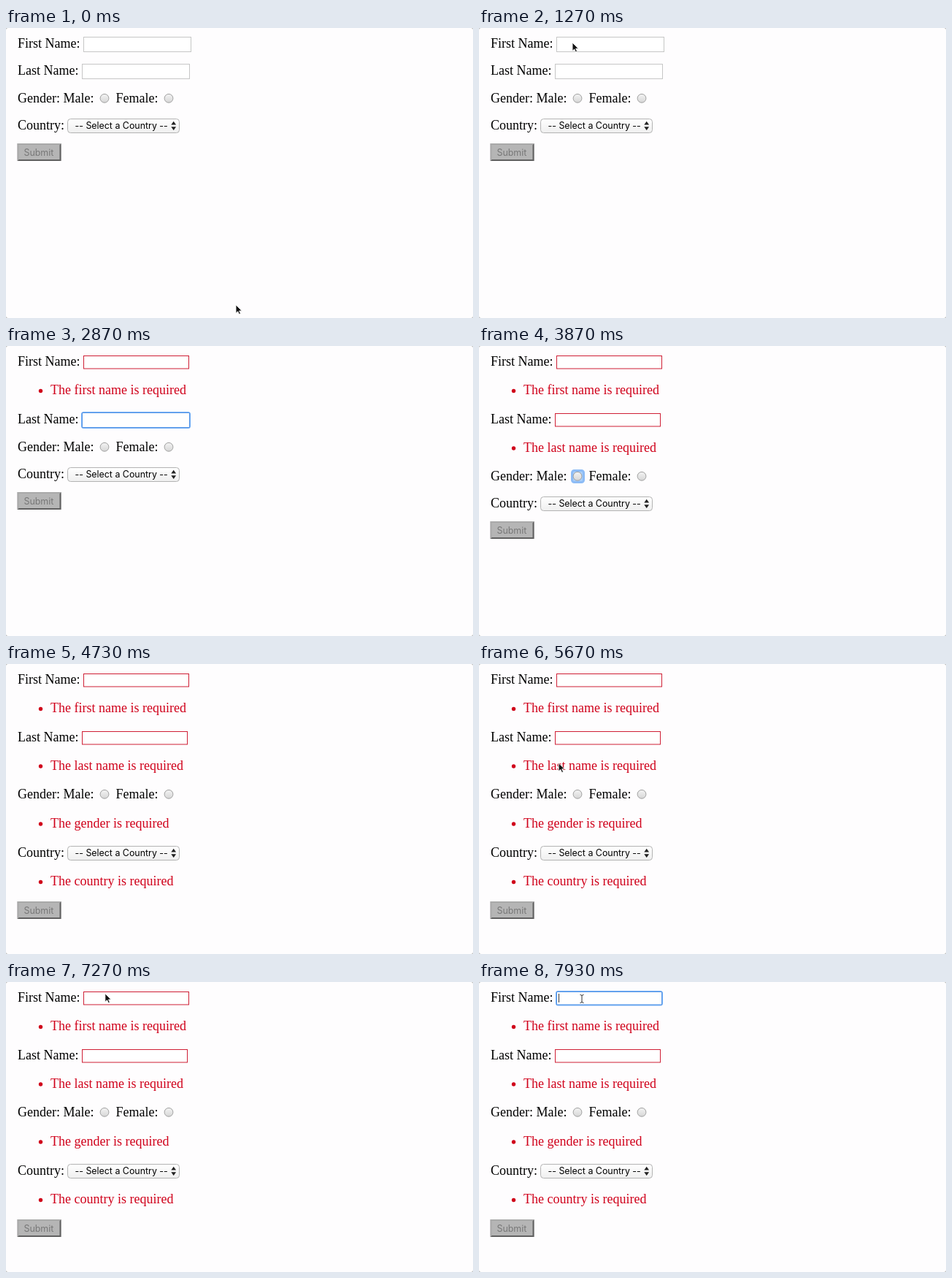
These frames come from a looping animation (640 px wide and 397 px high, 8000 ms). An HTML page:

```html
<!DOCTYPE html>
<html lang="en">
<head>
<meta charset="utf-8">
<title>Form validation</title>
<style>
html, body { margin: 0; width: 100%; height: 100%; overflow: hidden; background: #b4b4b4; }
svg { display: block; width: 100%; height: 100%; }
text { font: 18px "Liberation Serif", Times, serif; white-space: pre; }
.ui { font: 12.4px Inter, Roboto, sans-serif; }
.err { fill: #d0021b; }
.ring { fill: none; stroke: #6cabf5; stroke-width: 3; }
</style>
</head>
<body>
<svg viewBox="0 0 640 397">
  <defs>
    <linearGradient id="knob" x2="0" y2="1">
      <stop stop-color="#f4f4f4"/><stop offset="1" stop-color="#d6d6d6"/>
    </linearGradient>
    <linearGradient id="menu" x2="0" y2="1">
      <stop stop-color="#fff"/><stop offset="1" stop-color="#efefef"/>
    </linearGradient>
  </defs>
  <rect width="640" height="397" rx="3" fill="#fefdfe"/>

  <g class="row">
    <text x="16" y="27">First Name:</text>
    <rect class="ring" rx="2"/><rect class="input" data-x="106.5" data-y="12.5"/>
    <path id="caret" d="M109.5 16v12" stroke="#333"/>
    <g class="err"><circle cx="47.5" cy="61.5" r="2.7"/><text x="61" y="66">The first name is required</text></g>
  </g>

  <g class="row">
    <text x="16" y="64">Last Name:</text>
    <rect class="ring" rx="2"/><rect class="input" data-x="104.5" data-y="49.5"/>
    <g class="err"><circle cx="47.5" cy="98" r="2.7"/><text x="61" y="102.5">The last name is required</text></g>
  </g>

  <g class="row">
    <text x="16" y="101.5">Gender: Male:</text><text x="150.5" y="101.5">Female:</text>
    <rect class="ring" x="127.5" y="88.5" width="16" height="16" rx="3" style="fill:#a9cffa;stroke:#8dbcf6"/>
    <g fill="url(#knob)" stroke="#a0a0a0"><circle cx="135" cy="96.3" r="5.9"/><circle cx="223" cy="96.3" r="5.9"/></g>
    <g class="err"><circle cx="47.5" cy="137" r="2.7"/><text x="61" y="141.5">The gender is required</text></g>
  </g>

  <g class="row">
    <text x="16" y="138.5">Country:</text>
    <rect class="ring" x="84" y="124" width="154.5" height="20" rx="5"/>
    <rect x="84.5" y="124.5" width="153" height="19" rx="4" fill="url(#menu)" stroke="#b3b3b3"/>
    <text class="ui" x="94.5" y="138.3">-- Select a Country --</text>
    <path d="M226.3 132.6h6.8l-3.4-4.8zM226.3 135.2h6.8l-3.4 4.8z" fill="#222"/>
    <g class="err"><circle cx="47.5" cy="173.5" r="2.7"/><text x="61" y="178">The country is required</text></g>
  </g>

  <g class="row">
    <rect x="15.5" y="158" width="60" height="24" fill="#b5b5b5"/>
    <path d="M75.5 158v24h-60l2-2h56v-20z" fill="#606060"/>
    <path d="M15.5 182v-24h60l-2 2h-56v20z" fill="#a9a9a9"/>
    <text class="ui" x="24.5" y="174.5" fill="#777">Submit</text>
  </g>

  <g id="cursor">
    <path id="arrow" d="M0 0V11.5L2.7 9L4.5 13L6.5 12.1L4.7 8.2H8.3Z" fill="#111" stroke="#fff" stroke-width=".9"/>
    <path id="beam" d="M-2.5 -5.5Q0 -5.5 0 -4V4Q0 5.5 -2.5 5.5M2.5 -5.5Q0 -5.5 0 -4M0 4Q0 5.5 2.5 5.5" fill="none" stroke="#333"/>
  </g>
</svg>
<script>
const LOOP = 8000;
const all = s => [...document.querySelectorAll(s)];
const byId = id => document.getElementById(id);
const rows = all('.row'), errors = all('g.err'), rings = all('.ring'), inputs = all('.input');
const errorHeight = [42, 40, 43, 42];
const errorAt = [2700, 3000, 3930, 4600];

// [start, focused field]; -1 means none
const focusAt = [[0, -1], [2240, 0], [2700, 1], [3000, 2], [3930, 3], [4600, -1], [7800, 0]];

// [time, x, y] of the pointer
const path = [
  [40, 315, 379], [870, 112, 13], [1130, 122, 17], [1270, 128, 20], [1730, 40, 162],
  [1800, 40, 162], [2130, 149, 21], [5300, 149, 21], [6200, 41, 331],
  [6600, 41, 331], [7130, 128, 18], [7480, 150, 12], [7780, 141, 23]
];

const show = (el, on) => el.style.display = on ? '' : 'none';
const set = (el, attrs) => { for (const k in attrs) el.setAttribute(k, attrs[k]); };

function pointer(t) {
  const i = path.findIndex(p => p[0] > t);
  if (i === 0) return path[0].slice(1);
  if (i < 0) return path[path.length - 1].slice(1);
  const [a, ax, ay] = path[i - 1], [b, bx, by] = path[i];
  const u = (t - a) / (b - a), e = u * u * (3 - 2 * u);
  return [ax + (bx - ax) * e, ay + (by - ay) * e];
}

function draw(t) {
  const focus = focusAt.filter(f => f[0] <= t).pop()[1];
  let shift = 0;
  rows.forEach((row, i) => {
    set(row, { transform: `translate(0 ${shift})` });
    if (i > 3) return;
    const bad = t >= errorAt[i];
    show(errors[i], bad);
    show(rings[i], focus === i);
    if (inputs[i]) {
      const x = +inputs[i].dataset.x, y = +inputs[i].dataset.y + bad;
      const width = bad ? 144 : 147, height = bad ? 17.5 : 20;
      const stroke = focus === i ? '#5b98e6' : bad ? '#cf1f35' : '#c6c6c6';
      set(inputs[i], { x, y, width, height, stroke, fill: '#fff' });
      set(rings[i], { x, y, width, height });
    }
    if (bad) shift += errorHeight[i];
  });
  show(byId('caret'), t >= 7800);

  const beam = t >= 2080 && t < 5400 || t >= 7700;
  const [x, y] = pointer(t);
  set(byId('cursor'), { transform: `translate(${x} ${y})` });
  show(byId('cursor'), t < 2700 || t >= 5300);
  show(byId('beam'), beam);
  show(byId('arrow'), !beam);
}

function tick() {
  draw(performance.now() % LOOP);
  requestAnimationFrame(tick);
}
tick();
</script>
</body>
</html>
```
